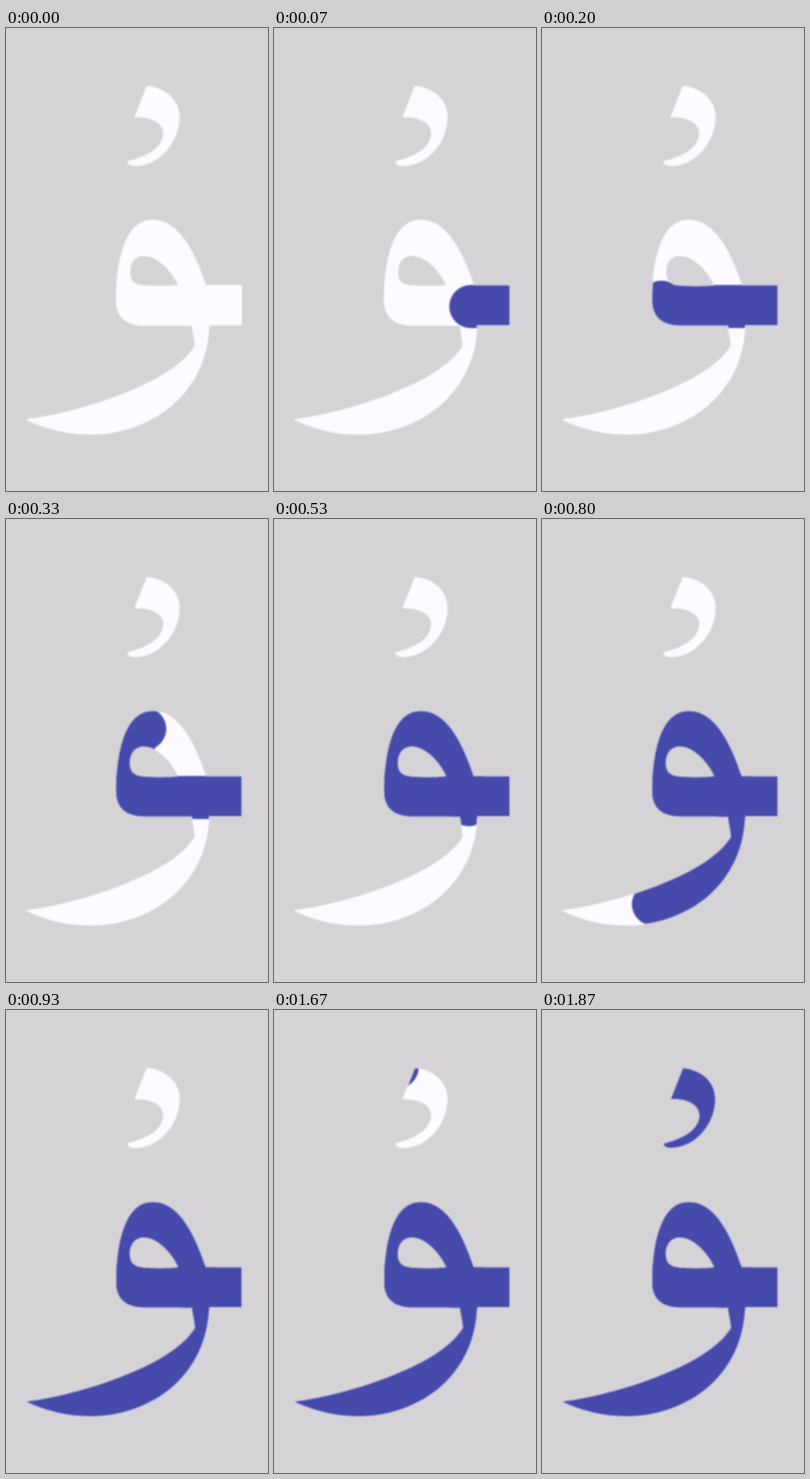
These frames come from a looping animation (366x645 px, 4 s). An HTML page:

```html
<!DOCTYPE html>
<html lang="ar">
<head>
<meta charset="utf-8">
<title>Letter tracing</title>
<style>
  html, body { margin: 0; height: 100%; overflow: hidden; background: #d5d3d6; }
  svg { display: block; width: 100vw; height: 100vh; }
  .soft { filter: blur(.8px); }
  .paper { fill: #fdfbff; stroke: #fdfbff; stroke-width: 1; }
  .pen { fill: none; stroke: #454aab; stroke-width: 60; stroke-linecap: round; stroke-linejoin: round; visibility: hidden; }
</style>
</head>
<body>
<svg viewBox="0 0 366 645">
  <defs>
    <path id="waw" clip-rule="evenodd" fill-rule="evenodd" d="M205 267.500C240 267.500 262 308 279 358.500H329V414H283.500
      C283 450 270 488 240 518C210 548 165 566 118 566C82 566 52 557 28.500 545.500
      C75 539.500 135 523 180 503C222 485 250 465 264 443C263 432 261 424 260 414.500
      H192C168 414 154 402 154 380C154 330 164 267.500 205 267.500Z
      M241 358.500C226 360 210 360 196 359C180 359 173 353 173 340
      C173 326 181 317 192 317C212 317 231 338 241 358.500Z"/>
    <path id="damma" d="M197 81C220 83 242 98 242 124C242 160 213 192 180 192
      C173 192 170 189 170 186C195 180 219 168 220 147C220 132 203 123 180 124Z"/>
    <clipPath id="wawClip"><use href="#waw"/></clipPath>
    <clipPath id="dammaClip"><use href="#damma"/></clipPath>
  </defs>
  <g class="soft">
    <use class="paper" href="#waw"/>
    <use class="paper" href="#damma"/>
    <g clip-path="url(#wawClip)">
      <path class="pen" id="bar" d="M330 388H186Q167 388 167 382"/>
      <path class="pen" id="loop" d="M167 382C167 330 180 288 205 290C235 292 262 345 272 398"/>
      <path class="pen" id="tail" d="M272 398C278 435 268 470 249 489C215 525 150 547 52 547"/>
    </g>
    <g clip-path="url(#dammaClip)">
      <path class="pen" id="hook" d="M172 79C185 108 222 104 229 134C229 162 205 178 180 186"/>
    </g>
  </g>
</svg>
<script>
  const LOOP = 4000, FPS = 15;

  // Pen stroke, first step, last step (15 steps per second)
  const strokes = [
    ['bar', 0, 3],
    ['loop', 3, 8],
    ['tail', 8.1, 14],
    ['hook', 24.99, 28]
  ].map(([id, from, to]) => {
    const el = document.getElementById(id);
    return { el, from, to, length: el.getTotalLength() };
  });

  function draw() {
    // The small lead makes steps land on times rounded to 10 ms
    const step = Math.floor((performance.now() % LOOP + 3.4) * FPS / 1000);
    for (const { el, from, to, length } of strokes) {
      const p = Math.min(1, (step - from) / (to - from));
      el.style.visibility = p > 0 && step < 60 ? 'visible' : 'hidden';
      el.style.strokeDasharray = `${Math.max(0, p) * length} 2000`;
    }
    requestAnimationFrame(draw);
  }
  draw();
</script>
</body>
</html>
```
